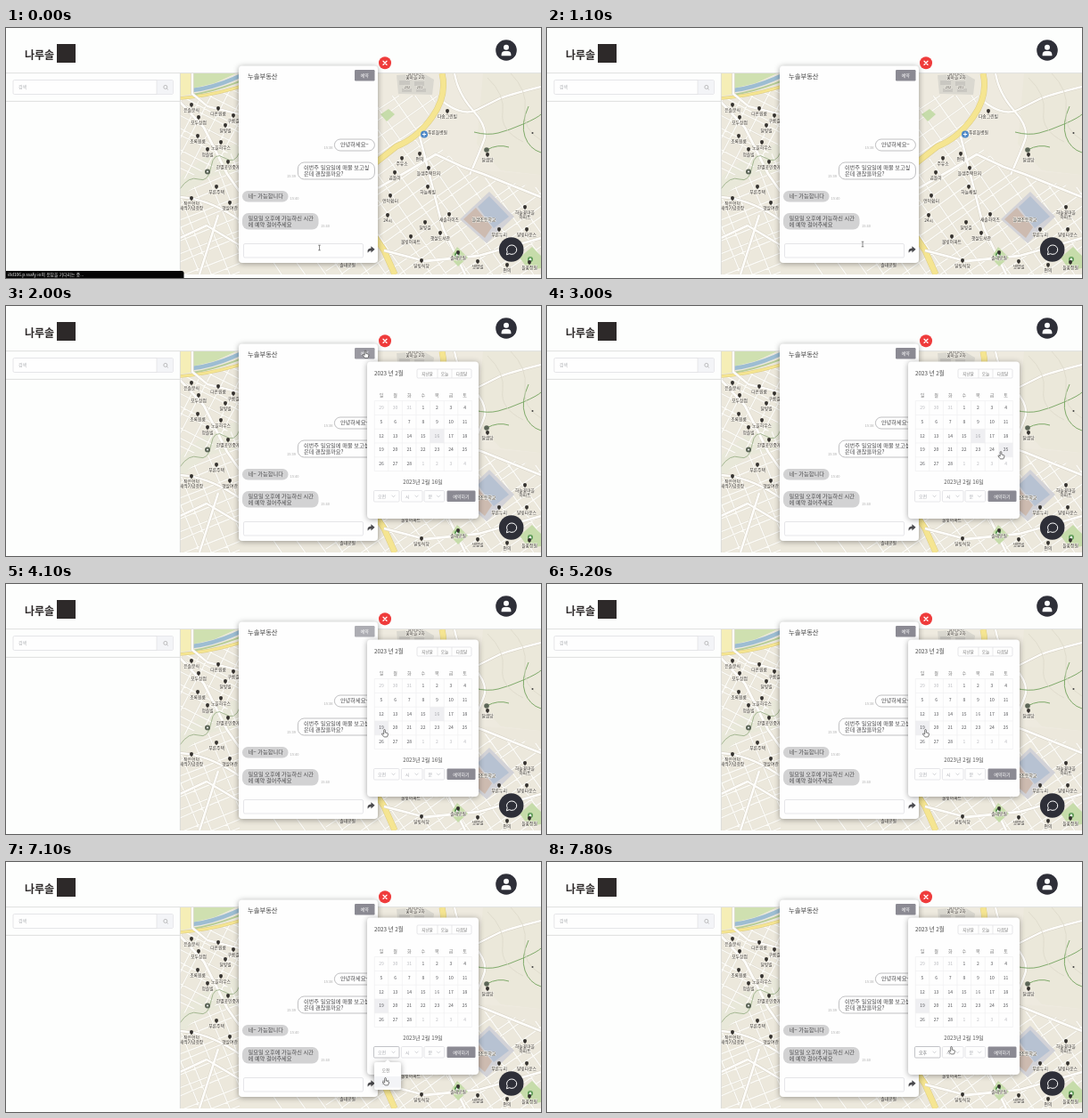
An HTML page that plays this animation: 600 by 281 pixels, repeating every 8 s.

```html
<!DOCTYPE html>
<html lang="ko">
<head>
<meta charset="utf-8">
<style>
html, body { margin: 0; width: 100%; height: 100%; overflow: hidden; background: #fdfefd; }
svg { display: block; width: 600px; height: 281px; font-family: 'Noto Sans CJK KR', 'Noto Sans', sans-serif; }
.card { fill: #fefefe; filter: drop-shadow(0 1px 3px rgba(0, 0, 0, .36)); }
.mid { text-anchor: middle; }
.box { fill: #fefefe; stroke: #dcdce0; stroke-width: .7; }
</style>
</head>
<body>
<svg viewBox="0 0 600 281">
  <defs>
    <clipPath id="mapClip"><rect x="195" y="51" width="405" height="226"/></clipPath>
    <clipPath id="westClip"><path d="M195 80L262 66V128L232 156 195 172Z"/></clipPath>
    <clipPath id="southClip"><path d="M262 130V277H195V190L232 164Z"/></clipPath>
    <clipPath id="hillClip"><path d="M417 76L484 76 470 108 417 146Z"/></clipPath>
    <clipPath id="eastClip"><path d="M417 155L470 118 520 165 600 180V277H262V262H417Z"/></clipPath>
  </defs>

  <rect width="600" height="281" fill="#fdfefd"/>
  <g id="map" clip-path="url(#mapClip)"></g>

  <path d="M0 50.6H600M195.4 51V277M0 82.4H195" stroke="#d9dad9" stroke-width=".8"/>
  <text x="21" y="35" font-size="12" font-weight="700" fill="#2d2929">나루솔</text>
  <rect x="57" y="18" width="21" height="21" fill="#2d2929"/>
  <circle cx="561" cy="25" r="11.8" fill="#2e2f38"/>
  <circle cx="561" cy="21.7" r="3" fill="#fff"/>
  <path d="M555.6 31.2v-1.2q0-4 4-4h2.8q4 0 4 4v1.2z" fill="#fff"/>

  <rect class="box" x="8" y="58.5" width="179.5" height="16" rx="1.5"/>
  <rect x="169" y="58.8" width="18.2" height="15.4" fill="#f3f4f7"/>
  <path d="M169 58.5V74.5" stroke="#dcdce0" stroke-width=".6"/>
  <text x="14" y="68.4" font-size="5" fill="#b0b2b6">검색</text>
  <path d="M180.2 67.8l1.6 1.6" stroke="#999" stroke-width=".6"/>
  <circle cx="178.8" cy="66.4" r="2" fill="none" stroke="#999" stroke-width=".6"/>

  <g id="chat">
    <rect class="card" x="261" y="42.5" width="156" height="221.5" rx="4"/>
    <text x="271" y="57" font-size="7.3" fill="#444">누솔부동산</text>
    <rect id="book" x="391" y="47" width="22.5" height="12.5" rx="1.2"/>
    <text class="mid" x="402.2" y="55" font-size="5" fill="#fff">예약</text>
    <g id="talk"></g>
    <rect class="box" x="266.5" y="242.5" width="134" height="15.5" rx="1.5"/>
    <path d="M409.4 245.2l4.2 3.6-4.2 3.6v-2.2q-2.8-.1-3.6 2.6-1.4-4.8 3.6-5.3z" fill="#4a4a4e"/>
    <circle cx="425" cy="39.2" r="7" fill="#ef3b3b"/>
    <path d="M423 37.2l4 4m0-4l-4 4" stroke="#fff" stroke-width="1.3" stroke-linecap="round"/>
  </g>

  <g id="fab">
    <circle cx="566.7" cy="249" r="13.8" fill="#2e2f38"/>
    <path d="M561.4 254.8l.8-3.2a5.6 5.2 0 1 1 2.2 2.1z" fill="none" stroke="#fff" stroke-width="1" stroke-linejoin="round"/>
  </g>

  <g id="popup">
    <rect class="card" x="405" y="62.5" width="125" height="176.5" rx="4"/>
    <text x="413" y="78.3" font-size="6.3" fill="#444">2023 년 2월</text>
    <rect class="box" x="461" y="71" width="61" height="10" rx="1.2"/>
    <path d="M484 71V81M500 71V81" stroke="#dcdce0" stroke-width=".6"/>
    <g class="mid" font-size="4.6" fill="#777">
      <text x="472.5" y="77.8">지난달</text><text x="492" y="77.8">오늘</text><text x="511" y="77.8">다음달</text>
    </g>
    <rect id="picked" width="15.6" height="15.8" fill="#efeff2"/>
    <rect id="hover" width="15.6" height="15.8" fill="#efeff2"/>
    <g id="days"></g>
    <text id="date" class="mid" x="467.5" y="200.4" font-size="6.2" fill="#555"></text>
    <g id="selects"></g>
    <rect x="494.5" y="207.5" width="32" height="12.5" rx="1.2" fill="#8b8a93"/>
    <text class="mid" x="510.5" y="215.7" font-size="5" fill="#fff">예약하기</text>
  </g>

  <g id="menu">
    <path class="card" d="M415 225h10l3-3 3 3h10q2 0 2 2v27q0 2-2 2h-26q-2 0-2-2v-27q0-2 2-2z"/>
    <rect x="413" y="241" width="30" height="12.5" fill="#f3f4f7"/>
    <text class="mid" x="426" y="235.8" font-size="5" fill="#888">오전</text>
    <text class="mid" x="426" y="249.3" font-size="5" fill="#888">오후</text>
  </g>

  <g id="status">
    <path d="M0 273H197q2.5 0 2.5 2.5V281H0z" fill="#050505"/>
    <text x="2" y="279" font-size="4.8" fill="#eee">i8d106.p.ssafy.io의 응답을 기다리는 중...</text>
  </g>
  <path id="cursor" stroke-linejoin="round"/>
</svg>

<script>
const $ = id => document.getElementById(id);
const line = (d, color, width, extra = '') =>
  `<path d="${d}" fill="none" stroke="${color}" stroke-width="${width}" stroke-linejoin="round" ${extra}/>`;
const area = (d, color) => `<path d="${d}" fill="${color}"/>`;
const text = (x, y, size, color, s, extra = '') =>
  `<text x="${x}" y="${y}" font-size="${size}" fill="${color}" ${extra}>${s}</text>`;

// Map
function streets(clip, x, y, angle, dx, dy) {
  let d = '';
  for (let i = -9; i <= 9; i++) {
    const bend = 3 * Math.sin(i * 2.3);
    d += `M${i * dx} -130L${i * dx + bend} 0V130`;
    d += `M-130 ${i * dy}L0 ${i * dy + bend}H130`;
  }
  const at = `transform="translate(${x} ${y}) rotate(${angle})"`;
  return `<g clip-path="url(#${clip})">${line(d, '#dedacf', 2, at)}${line(d, '#fcfbf6', 1.4, at)}</g>`;
}

function road(d, width, fill = '#fefdfa', edge = '#d4cfc2') {
  return line(d, edge, width + .9) + line(d, fill, width);
}

const ink = '#35322f';
const halo = 'class="mid" font-weight="500" stroke="#f8f5ed" stroke-width="1" paint-order="stroke"';

function label(x, y, s) {
  const rows = s.split('/');
  return `<circle cx="${x}" cy="${y - 8}" r="2" fill="${ink}"/><path d="M${x - 1.6} ${y - 7}h3.2l-1.6 2.6z" fill="${ink}"/>` +
    rows.map((r, i) => text(x, y + i * 5.3, 4.8, ink, r, halo)).join('');
}

function tree(x, y) {
  return `<circle cx="${x}" cy="${y}" r="3" fill="#5f9c58"/><path d="M${x} ${y - 2}l1.6 3h-3.2zM${x - .3} ${y + 1}h.6v1.2h-.6z" fill="#fff"/>`;
}

const yellow = '#f5e591', gold = '#dccb82';
const places = [
  [208, 94, '은솔분식'], [216, 108, '모두상점'], [238, 98, '다온원룸'], [246, 117, '달빛빌'],
  [215, 129, '초록원룸'], [241, 136, '노을하우스'], [226, 144, '청솔빌'], [249, 158, '한별공인중개'],
  [236, 186, '푸른주택'], [208, 199, '작은언덕/새싹기념광장'], [251, 204, '햇살여관'], [255, 106, '구름길'],
  [383, 268, '솔내공원'], [459, 52, '들샘상가/꽃마을 2차'], [495, 101, '다솜그린빌'],
  [444, 154, '주유소'], [464, 149, '편의'], [474, 165, '들샘주택단지'], [436, 170, '곰돌이'],
  [473, 186, '하늘채빌'], [431, 196, '언덕쉼터'], [428, 218, '24시'], [497, 217, '새솔하이츠'],
  [454, 242, '물빛아파트'], [487, 238, '햇살도서관'], [470, 226, '달빛길'], [466, 269, '달빛식당'],
  [562, 274, '편의'], [507, 260, '솔내공원'], [582, 209, '하늘꽃마을/아파트'], [540, 150, '달샘당'],
  [553, 234, '푸른누리'], [584, 234, '달빛타운스'], [587, 271, '들꽃정원'], [529, 270, '샛별빌']
];

$('map').innerHTML =
  '<rect x="195" y="51" width="405" height="226" fill="#ece8dc"/>' +
  area('M417 51H600V165L530 160 480 145 417 180Z', '#eeeadf') +
  area('M195 168L235 135 262 130V160L225 168 195 195Z', '#e8e8d9') +
  area('M535 51H600V165L555 160 528 130Z', '#ebe8da') +
  streets('westClip', 228, 115, 27, 14, 11) +
  streets('southClip', 230, 225, -22, 17, 12) +
  streets('hillClip', 450, 100, -35, 19, 14) +
  streets('eastClip', 480, 220, -35, 19, 13) +
  area('M195 51H209V74L195 77Z', '#f5eeb6') +
  area('M209 51H258L234 62 209 68Z', '#cfe0b0') +
  line('M209 70Q234 67 262 54', '#9dbdd2', 4.5) +
  line('M209 75Q234 71 262 60', '#b6cc96', 2) +
  road('M195 79Q230 76 262 66', 2.6, yellow, gold) +
  road('M209 51V74L226 88 262 97', 2.4) +
  road('M195 83L222 112 248 164 262 184', 2.8) +
  road('M195 190Q228 192 262 216M195 236L225 222 262 244M217 277L238 210', 2.6) +
  road('M489 82Q512 100 528 92T552 80 600 66M503 51Q507 74 524 93T536 126 520 165', 2.4) +
  road('M417 180L452 160 482 142 512 156 535 164 600 190M515 277L490 225 464 122', 2.8) +
  area('M438 53L468 51 480 58 478 75 440 74Z', '#dad8d0') +
  area('M420 97L429 91 436 97 427 105Z', '#c6dcaa') +
  area('M441 59h12v5h-12zM458 60h11v5h-11zM444 68h11v4h-11zM460 68h11v4h-11z', '#c9c7c1') +
  text(450, 68, 3.8, ink, '202', halo) + text(464, 68, 3.8, ink, '201', halo) +
  road('M489 51Q495 76 478 100T438 133L410 155', 6, yellow, gold) +
  road('M408 226L424 250 436 277', 6, yellow, gold) +
  road('M424 250L470 262 530 256 600 236', 2.8) +
  area('M509 215L542 184 570 212 539 242Z', '#d2d2d7') +
  area('M513 215L527 202 545 224 537 236Z', '#cdbbb0') +
  area('M529 201L542 189 564 212 547 225Z', '#b7c2d2') +
  area('M498 258L506 246 518 258 507 268Z', '#c6dcaa') +
  area('M576 258L590 246 600 256V270L586 272Z', '#c6dcaa') +
  line('M195 181Q205 166 216 170T230 156 245 146 262 139', '#9db38c', .9) +
  line('M525 117Q540 121 552 118T580 108 600 97M539 137Q552 130 564 134M586 88Q577 108 582 122T600 140', '#7faa6a', 1) +
  line('M540 56Q560 75 557 95T580 128M566 51Q585 70 582 92T600 126', '#dcd9ca', .8) +
  '<circle cx="226" cy="161.5" r="3" fill="#5b6557"/><circle cx="226" cy="161.5" r="1" fill="#fff"/>' +
  '<circle cx="539" cy="137" r="2.8" fill="#5b6557"/><circle cx="590.5" cy="118" r="1" fill="#444"/>' +
  '<circle cx="469" cy="119.5" r="4" fill="#4b86c6"/><path d="M469 117.3v4.4m-2.2-2.2h4.4" stroke="#fff"/>' +
  tree(506, 255) + tree(588, 260) +
  text(484, 119, 4.8, ink, '푸른들병원', halo) +
  text(536, 217, 4.8, ink, '들샘초등학교', halo) +
  places.map(p => label(...p)).join('');

// Chat
function bubble(x, y, w, h, mine, rows, time, tx, ty) {
  const paint = mine ? 'fill="#fefefe" stroke="#a5a5a8" stroke-width=".7"' : 'fill="#d2d2d3"';
  return `<rect x="${x}" y="${y}" width="${w}" height="${h}" rx="${Math.min(h / 2, 7)}" ${paint}/>` +
    rows.map((r, i) => text(x + 6.5, y + 8.3 + i * 6.5, 6.2, '#4b4b4d', r)).join('') +
    text(tx, ty, 4, '#aaa', time);
}
$('talk').innerHTML =
  bubble(368.4, 125, 45, 13, true, ['안녕하세요~'], '15:38', 356.5, 136) +
  bubble(327.4, 151, 86, 19, true, ['이번주 일요일에 매물 보고싶', '은데 괜찮을까요?'], '15:39', 315, 168) +
  bubble(265, 183, 51.5, 12.5, false, ['네~ 가능합니다'], '15:40', 318.5, 192.5) +
  bubble(265, 208, 85.5, 18.5, false, ['일요일 오후에 가능하신 시간', '에 예약 걸어주세요'], '15:40', 353, 224);

// Calendar
const gx = 413.2, gy = 106.6, cw = 15.6, ch = 15.8;
let cal = '', grid = '';
for (let i = 0; i <= 7; i++) grid += `M${gx + i * cw} ${gy}v${ch * 5}`;
for (let i = 0; i <= 5; i++) grid += `M${gx} ${gy + i * ch}h${cw * 7}`;
cal += line(grid, '#ececef', .6);
[...'일월화수목금토'].forEach((d, i) => cal += text(gx + (i + .5) * cw, 101.8, 5, '#777', d, 'class="mid"'));
for (let i = 0; i < 35; i++) {
  const n = i - 2, inside = n > 0 && n < 29;
  const day = n < 1 ? n + 31 : inside ? n : n - 28;
  cal += text(gx + (i % 7 + .5) * cw, gy + Math.floor(i / 7) * ch + 9.3, 5, inside ? '#55565a' : '#bbbcc0', day,
    `class="mid" id="day${i}"`);
}
$('days').innerHTML = cal;

const select = (x, w, s, id) =>
  `<rect class="box" id="${id}Box" x="${x}" y="207.5" width="${w}" height="12.5" rx="1.2"/>` +
  text(x + 4.5, 215.7, 5, '#aaacb2', s, `id="${id}"`) +
  line(`M${x + w - 8.5} 212.7l2 2 2-2`, '#b4b6bb', .6);
$('selects').innerHTML = select(412.5, 28.5, '오전', 'half') + select(443.5, 23.5, '시', 'hour') + select(469, 22.5, '분', 'min');

// Cursor
const shapes = {
  hand: ['M-.8.4a.8.8 0 0 1 1.6 0V3l2.4.6q.8.2.7 1l-.5 2.4q-.2.9-1 .9H0q-.7 0-1.1-.6L-3 4.8q-.2-.8.7-.8l1.5.8z', '#fff', '#222', .6],
  arrow: ['M0 0V6.5L1.6 5.2 2.7 7.6 3.7 7.1 2.6 4.8H4.6Z', '#fff', '#222', .5],
  beam: ['M-1.3-2.8H1.3M0-2.8V2.8M-1.3 2.8H1.3', 'none', '#444', .6]
};
const path = [
  [0, 351.5, 247], [1000, 351.5, 247], [1100, 354, 243], [1400, 376, 172], [1700, 400, 72], [1900, 403, 50.5],
  [2000, 403, 50.5], [2300, 436, 84], [2800, 506, 160], [2900, 504, 149], [3000, 509, 164], [3200, 508, 159],
  [3300, 508, 159], [3600, 458, 156], [3800, 424.5, 164], [5300, 424.5, 164], [5900, 445, 210],
  [6100, 432, 209], [6500, 432, 209], [7100, 425.5, 243], [7300, 425.5, 243], [7800, 453.5, 208]
];
const clamp = v => Math.max(0, Math.min(1, v));

function pointer(t) {
  const i = path.findIndex(p => p[0] > t);
  if (i < 0) return path[path.length - 1].slice(1);
  const [a, b] = [path[i - 1], path[i]];
  const k = (t - a[0]) / (b[0] - a[0]);
  return [a[1] + (b[1] - a[1]) * k, a[2] + (b[2] - a[2]) * k];
}

function place(el, cell) {
  el.setAttribute('x', gx + cell % 7 * cw);
  el.setAttribute('y', gy + Math.floor(cell / 7) * ch);
}

function draw(t) {
  const [x, y] = pointer(t);
  const within = (l, top, r, b) => x >= l && x <= r && y >= top && y <= b;
  const open = t >= 2000, chosen = t >= 5100, pm = t >= 7300;
  const menu = pm ? clamp(1 - (t - 7200) / 300) : clamp((t - 6200) / 200);
  const onBook = within(391, 47, 413, 59);
  const onGrid = open && within(gx, gy, gx + 7 * cw - .1, gy + 5 * ch - .1);
  const onForm = open && (within(412, 207, 526, 220) || menu > 0 && within(413, 225, 443, 255));
  const kind = t < 1200 ? 'beam' : onBook || onGrid || onForm ? 'hand' : 'arrow';

  $('status').setAttribute('opacity', clamp(1 - (t - 400) / 300));
  $('popup').style.display = open ? '' : 'none';
  $('book').setAttribute('fill', t >= 4100 && t < 5100 ? '#adadb3' : onBook ? '#9a99a1' : '#8b8a93');
  place($('picked'), chosen ? 21 : 18);
  $('day18').setAttribute('fill', chosen ? '#77787c' : '#a4a5aa');
  $('hover').style.display = onGrid ? '' : 'none';
  if (onGrid) place($('hover'), Math.floor((y - gy) / ch) * 7 + Math.floor((x - gx) / cw));
  $('date').textContent = `2023년 2월 ${chosen ? 19 : 16}일`;
  $('half').textContent = pm ? '오후' : '오전';
  $('half').setAttribute('fill', pm ? '#66676b' : '#aaacb2');
  $('halfBox').style.stroke = t >= 6300 ? '#a9abb0' : '#dcdce0';
  $('menu').style.display = menu > 0 ? '' : 'none';
  $('menu').setAttribute('opacity', menu);

  const [d, fill, stroke, width] = shapes[kind];
  const c = $('cursor');
  c.setAttribute('d', d);
  c.setAttribute('fill', fill);
  c.setAttribute('stroke', stroke);
  c.setAttribute('stroke-width', width);
  c.setAttribute('transform', `translate(${x} ${y})`);
}

function tick() {
  draw(Math.floor(performance.now() % 8000 / 100) * 100);
  requestAnimationFrame(tick);
}
tick();
</script>
</body>
</html>
```
